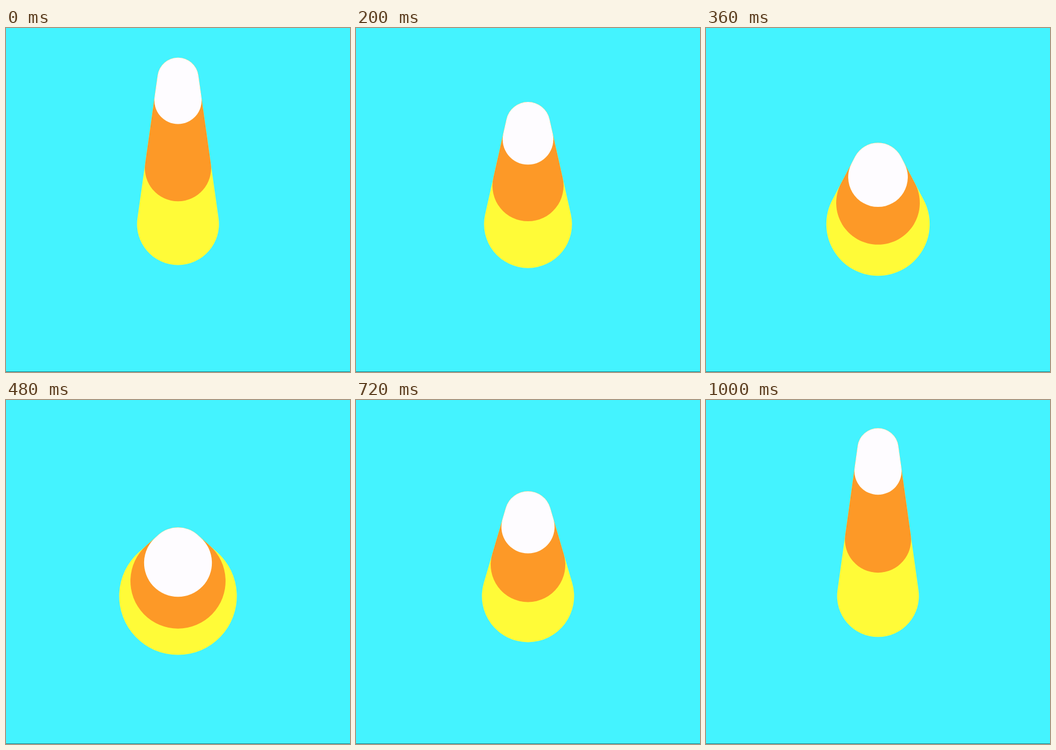
An HTML page for the animation above (1040 ms loop, 600x600 px).

```html
<!DOCTYPE html>
<html lang="en">
<head>
<meta charset="utf-8">
<title>Candy corn</title>
<style>
  html, body { margin: 0; width: 100%; height: 100%; overflow: hidden; background: #44f3ff; }
  svg { display: block; width: 100vw; height: 100vh; }
</style>
</head>
<body>
<svg viewBox="0 0 600 600">
  <rect width="600" height="600" fill="#44f3ff"/>
  <rect y="599" width="600" height="1" fill="#1c808a"/>
  <path id="yellow" fill="#fffb38"/>
  <path id="orange" fill="#fd9927"/>
  <path id="white" fill="#fefcff"/>
</svg>
<script>
  const LOOP = 1040;
  const STEP = 40;
  const CENTER_X = 300;
  const BASE_Y = 342;

  // Each band reaches this far from the tip circle to the base circle.
  const bands = [["yellow", 1], ["orange", 0.617], ["white", 0.153]]
    .map(([id, reach]) => ({ path: document.getElementById(id), reach }));

  // Outline around two circles on the vertical axis, joined by their tangents.
  function hull(topY, topR, bottomY, bottomR) {
    const sin = (bottomR - topR) / (bottomY - topY);
    const cos = Math.sqrt(1 - sin * sin);
    const point = (y, r, side) =>
      `${(CENTER_X + side * r * cos).toFixed(3)} ${(y - r * sin).toFixed(3)}`;
    return `M${point(topY, topR, -1)}` +
      `A${topR} ${topR} 0 0 1 ${point(topY, topR, 1)}` +
      `L${point(bottomY, bottomR, 1)}` +
      `A${bottomR} ${bottomR} 0 1 1 ${point(bottomY, bottomR, -1)}Z`;
  }

  function draw(time) {
    const step = Math.floor((time % LOOP) / STEP);
    const phase = 0.28 + 0.2332 * step;
    const length = 163.5 + 93.8 * Math.cos(phase) + 1.5 * Math.cos(3 * phase);

    // The candy swells as it gets shorter.
    const baseR = 60 + 2915 / length;
    const tipR = baseR / 2;
    const tipY = BASE_Y - length;
    for (const { path, reach } of bands) {
      const y = tipY + length * reach;
      const r = tipR + (baseR - tipR) * reach;
      path.setAttribute("d", hull(tipY, tipR, y, r));
    }
  }

  const start = performance.now();
  function tick() {
    draw(performance.now() - start);
    requestAnimationFrame(tick);
  }
  tick();
</script>
</body>
</html>
```
